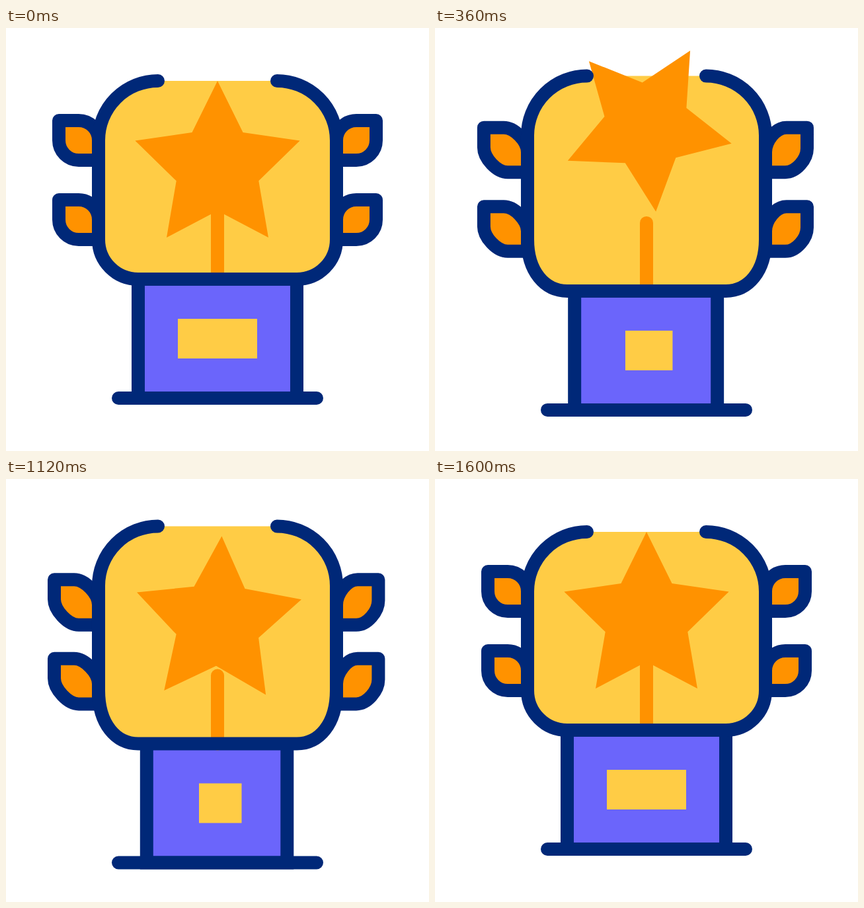
Write an HTML page that moves like this. It is 640 px wide and 640 px high and loops after 2 s.

```html
<!DOCTYPE html>
<html lang="en">
<head>
<meta charset="utf-8">
<title>Trophy</title>
<style>
  html, body { margin: 0; width: 100%; height: 100%; overflow: hidden; background: #fff; }
  svg { display: block; width: 100%; height: 100%; }
  .line { stroke: #002878; stroke-width: 20; stroke-linecap: round; fill: none; }
  .leaf { fill: #ff9200; stroke-linejoin: round; }
  .gold { fill: #ffcc45; }
  .star { fill: #ff9200; }
  .stem { stroke: #ff9200; stroke-width: 20; stroke-linecap: round; }
  .box { fill: #6b65fb; }
</style>
</head>
<body>
<svg viewBox="0 0 640 640">
  <path id="leaves" class="line leaf"/>
  <path id="box" class="line box"/>
  <rect id="plate" class="gold" height="60"/>
  <path id="base" class="line"/>
  <path id="fill" class="gold"/>
  <path id="stem" class="stem"/>
  <path id="star" class="star"/>
  <path id="cup" class="line"/>
</svg>
<script>
const LOOP = 2000, STEP = 40;
const $ = id => document.getElementById(id);
const set = (id, attrs) => {
  for (const k in attrs) $(id).setAttribute(k, attrs[k]);
};
const ease = (t, from, to) => {
  const x = Math.min(1, Math.max(0, (t - from) / (to - from)));
  return x * x * (3 - 2 * x);
};
const mix = (a, b, p) => a + (b - a) * p;

function starPath(outer, inner) {
  const pts = [];
  for (let i = 0; i < 10; i++) {
    const r = i % 2 ? inner : outer, a = i * Math.PI / 5;
    pts.push((r * Math.sin(a)).toFixed(2) + ' ' + (-r * Math.cos(a)).toFixed(2));
  }
  return 'M' + pts.join('L') + 'Z';
}

// One leaf: stalk side at x, tip side at tip; corners keep fixed-length handles.
function leafPath(x, mid, tip, bend, p, dy) {
  const h = 16.57, s = Math.sign(tip - x), low = x + s * 30;
  const top = mix(140, 152.2, p) + dy, bottom = mix(200, 220.8, p) + dy;
  const inY = mix(170, 190.5, p) + dy, outY = mix(170, bend, p) + dy;
  return `M${x} ${inY}C${x} ${inY - h} ${mid - s * h} ${top} ${mid} ${top}` +
    `H${tip}V${outY}C${tip} ${outY + h} ${low + s * h} ${bottom} ${low} ${bottom}H${x}Z`;
}

function drawBody(p) {
  const top = 80 - 8.5 * p, drop = 20.5 * p, bottom = 380 + drop, foot = 560 + drop;
  const shoulder = top + 90, k = 353 + 18 * p;
  const cup = `M230 ${top}A90 90 0 0 0 140 ${shoulder}V320` +
    `C140 ${k} 166.5 ${bottom} 200 ${bottom}H440` +
    `C473.5 ${bottom} 500 ${k} 500 320V${shoulder}A90 90 0 0 0 410 ${top}`;
  set('cup', { d: cup });
  set('fill', { d: cup + 'Z' });

  const leaves = [0, 120 - 0.4 * p].map(dy =>
    leafPath(140, 110 - 7 * p, 80 - 7 * p, 182, p, dy) +
    leafPath(500, 530 + 2 * p, 560 + 3.4 * p, 184, p, dy));
  set('leaves', { d: leaves.join('') });

  const left = 200 + 12.8 * p, right = 440 - 14.7 * p;
  set('box', { d: `M${left} ${bottom}V${foot}H${right}V${bottom}` });
  set('base', { d: `M170 ${foot}H470` });
  set('plate', { x: 260 + 32 * p, y: 440 + drop, width: 120 - 55.5 * p });
  set('stem', { d: `M320 ${277 + drop}V${bottom}` });
}

function draw(t) {
  const p = ease(t, 80, 440) - ease(t, 1120, 1480);
  const turn = 72 * (ease(t, 1080, 1440) - ease(t, 160, 520));
  const hop = ease(t, 160, 320) - ease(t, 320, 520) +
    ease(t, 1080, 1280) - ease(t, 1280, 1440);
  drawBody(p);
  const y = 210.3 + 15.7 * p - 86 * hop;
  set('star', { transform: `translate(320 ${y}) rotate(${turn}) translate(0 .8)` });
}

set('star', { d: starPath(131, 65.5) });
draw(0);

let start;
function tick(now) {
  start ??= now;
  // The motion runs at 25 poses per second.
  draw(Math.floor(((now - start) % LOOP + 2) / STEP) * STEP);
  requestAnimationFrame(tick);
}
requestAnimationFrame(tick);
</script>
</body>
</html>
```
